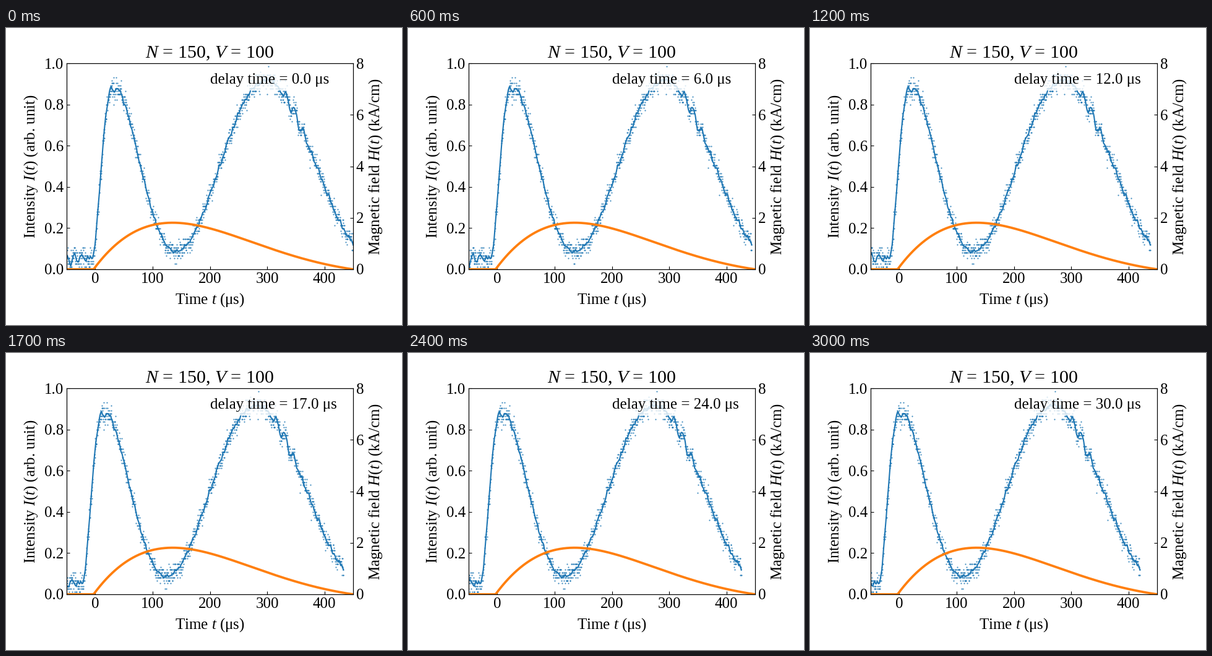
These frames come from a looping animation (640x480 px, 3.1 s). A matplotlib script:

```python
import numpy as np
import matplotlib.pyplot as plt
from matplotlib.animation import FuncAnimation

W, H, DPI = 640, 480, 100
BLUE, ORANGE = "tab:blue", "tab:orange"
FRAMES, INTERVAL = 31, 100
LEVEL = 0.0133  # digitiser step
STEP = 0.4      # sampling step in µs

plt.rcParams.update({
    "font.family": "Liberation Serif",
    "font.size": 18,
    "mathtext.fontset": "custom",
    "mathtext.rm": "Liberation Serif",
    "mathtext.it": "Liberation Serif:italic",
    "xtick.direction": "in",
    "ytick.direction": "in",
})

# Turning points of the intensity: time in µs, level, skew of the way there
TURNS = [(-6, 0.055, 1), (27, 0.86, 0.9), (38, 0.885, 1),
         (140, 0.092, 0.78), (295, 0.915, 1), (480, 0.07, 1)]


def swing(t):
    """Join the turning points with skewed half cosines."""
    level = np.full(t.size, TURNS[0][1])
    for (t0, v0, _), (t1, v1, skew) in zip(TURNS, TURNS[1:]):
        part = np.clip((t - t0) / (t1 - t0), 0, 1) ** skew
        level += (v1 - v0) * (1 - np.cos(np.pi * part)) / 2
    return level


def ripple(t, peak, period, width, size):
    wave = np.cos(2 * np.pi * (t - peak) / period)
    return size * wave * np.exp(-((t - peak) / width) ** 2)


def intensity(t, rng):
    """Return the averaged line and the noisy, quantised samples."""
    line = swing(t)
    line += ripple(t, -37, 13.5, 24, 0.025)
    line += ripple(t, 27, 12, 8, 0.02)
    line += ripple(t, 348, 15, 24, 0.025)
    window = np.hanning(13)
    drift = rng.normal(0, 0.016, t.size)
    line += np.convolve(drift, window / window.sum(), "same")
    noise = rng.normal(0, 0.024, t.size)
    samples = np.round((line + noise) / LEVEL) * LEVEL
    return line, np.maximum(samples, LEVEL)


def field(t, start=-3, length=453, rise=138, top=1.81):
    """Damped half sine that peaks `rise` µs after it starts."""
    w = np.pi / length
    damping = w / np.tan(w * rise)

    def pulse(x):
        return np.exp(-damping * x) * np.sin(w * x)

    return top * pulse(np.clip(t - start, 0, length)) / pulse(rise)


def label(x, y, text, rotation=0):
    """Place a centred label by its baseline, in pixels from the top left."""
    fig.text(x / W, 1 - y / H, text, ha="center", va="baseline",
             rotation=rotation, rotation_mode="anchor")


fig = plt.figure(figsize=(W / DPI, H / DPI), dpi=DPI, facecolor="white")
ax = fig.add_axes([98 / W, 90 / H, 463 / W, 332.8 / H])
ax.set(xlim=(-50, 450), ylim=(0, 1), xticks=range(0, 401, 100))
ax.set_title("$N$ = 150, $V$ = 100")
ax2 = ax.twinx()
ax2.set(ylim=(0, 8), yticks=range(0, 9, 2))

label(329.5, 446, "Time $t$ (μs)")
label(47, 223.8, "Intensity $I(t)$ (arb. unit)", 90)
label(604, 223.8, "Magnetic field $H(t)$ (kA/cm)", 90)

t = np.arange(-50, 450 + STEP, STEP)
line, samples = intensity(t, np.random.default_rng(7))

dots, = ax.plot(t, samples, ".", color=BLUE, ms=1)
curve, = ax.plot(t, line, color=BLUE, lw=1.5)
ax2.plot(t, field(t), color=ORANGE, lw=2.7)
note = ax.text(200, 0.9, "", bbox=dict(facecolor="white", edgecolor="none", alpha=0.8))


def update(i):
    dots.set_xdata(t - i)
    curve.set_xdata(t - i)
    note.set_text(f"delay time = {i:.1f} μs")
    return dots, curve, note


anim = FuncAnimation(fig, update, frames=FRAMES, interval=INTERVAL,
                     repeat=True, repeat_delay=0, blit=False)
plt.show()
```
